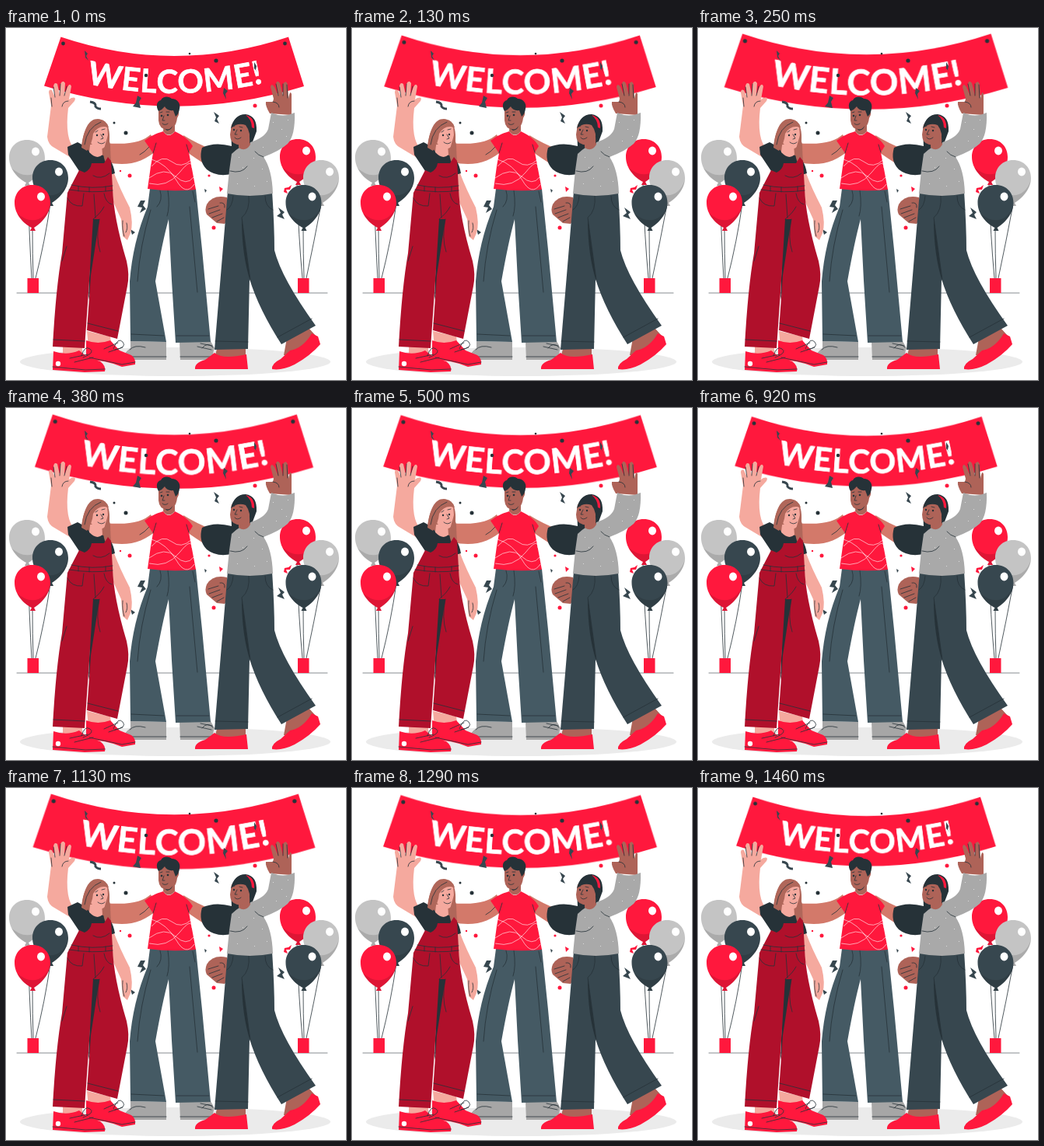
An HTML page for the animation above (1500 ms loop, 437 by 453 pixels).

```html
<!DOCTYPE html>
<html lang="en">
<head>
<meta charset="utf-8">
<title>Welcome</title>
<style>
html, body { margin: 0; width: 100%; height: 100%; overflow: hidden; background: #fff; }
svg { display: block; width: 437px; height: 453px; }
#banner { transform-origin: 216px 56px; }
.red { fill: #ff183d; } .wine { fill: #b0102b; } .ink { fill: #263238; }
.dark { fill: #37474f; } .slate { fill: #455a64; } .grey { fill: #c4c4c4; }
.shoe { fill: #a6a6a6; } .peach { fill: #f5a99e; } .tan { fill: #d3796a; }
.brown { fill: #ae6358; } .hair { fill: #b0675a; } .wool { fill: #a9a9a9; }
.line { fill: none; stroke: #263238; stroke-width: .8; stroke-linecap: round; stroke-linejoin: round; }
.white { fill: none; stroke: #fff; stroke-width: .6; }
text { font: 700 41.5px Lato, sans-serif; fill: #fff; stroke: #fff; stroke-width: .7; letter-spacing: .9px; }
</style>
</head>
<body>
<svg viewBox="0 0 437 453">
<defs>
  <path id="arc" d="M54 58Q216 109.500 378 58"/>
  <g id="balloon">
    <path d="M0-28C14-28 23-18 23-5C23 10 10 22 2 27L4 31H-3L-1 27C-11 22-23 10-23-5C-23-18-14-28 0-28Z"/>
    <path d="M-20 8C-15 18-6 25-1 27L-3 31H4L2 27C11 22 21 12 23-3C16 20-4 23-20 8Z" fill="#000" opacity=".13"/>
    <ellipse cx="11" cy="-13" rx="5" ry="5.400" fill="#fff"/>
  </g>
</defs>

<path class="line" d="M14 341H413" opacity=".7"/>
<ellipse cx="217.500" cy="429.500" rx="199.500" ry="18.500" fill="#ebebeb"/>

<path class="line" d="M28 202Q30 270 33 322M57 226Q50 275 38 322M34 260Q34 290 35 322"/>
<path class="line" d="M374 201Q376 270 381 322M405 227Q396 275 386 322M382 260Q382 290 383 322"/>
<use href="#balloon" class="grey" x="27" y="172"/>
<use href="#balloon" class="dark" x="57" y="198"/>
<use href="#balloon" class="red" x="34" y="230"/>
<use href="#balloon" class="red" x="375" y="171"/>
<use href="#balloon" class="grey" x="405" y="198"/>
<use href="#balloon" class="dark" x="382.500" y="230"/>
<path class="red" d="M27.500 322H42V341H27.500ZM375 322H389.500V341H375Z"/>

<g id="banner">
  <path class="red" d="M70.500 11.500Q216 60.500 363 11.500L383 75Q216 126.500 49 74.500Z"/>
  <circle class="ink" cx="73.500" cy="20" r="2.400"/><circle class="ink" cx="358.500" cy="20" r="2.400"/>
  <text text-anchor="middle"><textPath href="#arc" startOffset="50.500%">WELCOME!</textPath></text>
</g>

<g id="confetti">
  <path class="dark" d="M101 29L105 33L103 36L106 42L102 38ZM169 87L174 90L171 95L173 103L163 101L167 96ZM173 222L179 222L176 228L180 233L172 238L175 231L169 230ZM280 77L285 81L282 85L283 92L279 84ZM319 44L322 49L321 54L324 58L319 52ZM267 108L274 113L271 117L274 123L268 120L270 115ZM160 259L166 263L162 266ZM350 231L358 237L355 240L358 246L348 242L353 238ZM255 207L258 209L256 212Z"/>
  <path d="M108 95Q116 96 115 101Q117 104 122 104" fill="none" stroke="#37474f" stroke-width="3"/>
  <path class="red" d="M367 202L365 208L360 208L362 213L357 211L358 206L363 205ZM274 204L279 207L275 211ZM225 143L230 144L228 148Z"/>
</g>

<!-- man -->
<path class="tan" d="M186 137C176 146 159 151 128 148L129 173C156 178 176 174 195 156ZM228 138Q244 148 264 156L260 178Q244 168 230 158Z"/>
<path class="line" d="M184 153Q178 160 172 163"/>
<path class="shoe" d="M160 403L206 404V427H150Q151 418 160 412ZM223 404L263 403L268 412Q265 418 267 427H224Z"/>
<path class="line" d="M151 423H206M224 423H266M246 410L264 414M250 406L265 409M252 412Q259 403 266 411M179 411Q165 407 159 414" stroke-width="1.200"/>
<path class="slate" d="M185 207H244L252 285L263 404L218 405L213 325L209 246Q201 275 192 326L206 404L160 403L159 326Q163 275 182 230Z"/>
<path class="line" d="M208 209Q211 230 207 242M198 209Q202 222 194 230M161 394L203 396M219 396L261 396M186 234Q172 280 169 326M240 210L243 224M236 230L246 340"/>
<path class="red" d="M202 133C192 136 186 139 178 145L189 161L186 178L182 207Q213 211 244 208L235 160L240 152C235 144 228 138 217 133Q209 143 202 133Z"/>
<path class="white" d="M187 178Q201 162 213 172T239 169M184 193Q204 178 218 191T241 192M184 200Q207 206 223 186T239 180M187 169Q207 175 219 196T242 201"/>
<path class="line" d="M189 161L193 148M235 160L232 150"/>
<path class="brown" d="M203 121H217V133Q209 142 202 133Z"/>
<path class="brown" d="M196 102Q209 96 219 104Q225 108 220 116Q218 131 207 131Q197 130 196 119Z"/>
<path class="ink" d="M196 107C192 100 194 94 199 93C202 87 210 88 213 91C220 91 225 97 223 104Q222 111 218 114L215 106Q207 107 204 101Q201 105 196 107ZM202 128Q209 134 214 126Q213 131 207 132Z"/>
<circle class="ink" cx="200" cy="113" r="1.300"/><circle class="ink" cx="208" cy="112" r="1.300"/>
<path class="line" d="M198 109L201 108M206 108L210 108M203 113L201 119H204M201 123Q204 126 208 123"/>

<!-- woman on the left -->
<path class="peach" d="M132 184L139 187Q146 206 159 231Q164 252 160 264L156 273L150 268L148 246L132 211Z"/>
<path class="line" d="M150 248Q149 260 152 268M155 251Q157 258 154 263"/>
<path class="peach" d="M89 157Q75 143 80 103L88 94Q91 88 84 90L81 92L84 75Q82 70 79 76L75 86L76 71Q73 66 70 72L69 86L66 72Q62 69 61 75L63 89L59 80Q55 78 55 83L58 100L53 140Q54 150 62 154L92 172Z"/>
<path class="line" d="M69 87L70 72M75 87L78 75M63 89L61 76M80 94Q73 94 72 101M59 101L58 90"/>
<path class="hair" d="M97 154C100 130 106 117 118 117C131 118 134 131 133 146L135 181Q127 181 122 160L103 158Z"/>
<path class="ink" d="M79 153L92 147Q101 151 108 160L125 164Q137 168 140 187L130 190L96 187L80 163Z"/>
<path class="peach" d="M108 150L123 150L124 163Q117 170 107 160Z"/>
<path class="peach" d="M108 130Q121 120 130 128Q133 148 126 154Q118 159 110 149Q103 144 106 138Z"/>
<path class="hair" d="M97 154Q99 126 114 119Q128 115 132 128Q119 124 112 136Q111 148 104 158ZM127 152L131 138L134 150L135 180Q126 176 125 160Z"/>
<path class="line" d="M101 150Q104 128 122 121M115 134L118 132M123 131L127 130M122 137L125 142L122 143M118 147Q123 151 127 147"/>
<circle class="ink" cx="117" cy="138" r="1.200"/><circle class="ink" cx="125" cy="137" r="1.200"/>
<path d="M73 409H98V422H73ZM104 390L134 397L136 411H106Z" class="peach"/>
<path class="red" d="M103 402Q118 408 134 402L146 415L161 421Q167 425 166 433L149 436Q128 427 103 427ZM61 416Q78 422 94 415Q105 425 121 429Q129 435 127 442L101 443L60 440Z"/>
<path class="line" d="M60 436L102 440L127 439M107 424L149 433L166 430M82 425L105 420M88 430L112 424M97 422Q101 408 108 413T99 424M126 413L144 405M132 417L150 411M138 413Q144 397 150 404T140 414" stroke-width="1.100"/>
<circle cx="67" cy="432" r="3.200" fill="#fff"/>
<path class="ink" d="M110 236H124L119 290L106 350Z"/>
<path class="wine" d="M94 183L101 186Q109 182 110 174H126L131 166L135 171L137 206Q138 243 155 300Q159 318 156 332L143 400L104 389L109 318L120 246L112 246Q107 330 101 412L60 410Q64 335 72 290L79 212Z"/>
<path class="line" d="M84 202Q111 208 137 203M81 208Q112 213 137 209M93 204V210M107 205V211M128 204V210M79 219Q84 230 98 229L100 213M126 213Q128 225 136 227M61 401L101 403M105 380L144 390M120 246Q115 270 121 288M113 214L115 244M112 190Q122 196 133 187M126 230Q122 238 112 246M72 300L78 281"/>

<!-- woman on the right -->
<path class="brown" d="M284 218Q266 214 258 227Q255 234 258 240L271 251L281 252L289 240Z"/>
<path class="line" d="M260 233L273 229M261 239L275 234M265 244L278 239M271 249L280 244M275 225Q282 224 281 231"/>
<path class="ink" d="M289 132Q292 111 308 111Q323 113 322 133L316 149L304 160Q291 168 290 188Q270 192 258 182Q247 171 252 154Q268 146 290 152Z"/>
<path class="brown" d="M339 110Q333 100 334 95L343 95L344 91L340 76Q341 70 345 76L350 87L347 72Q348 66 352 71L356 87L356 72Q360 66 362 73L363 91Q365 79 367 85L367 112Z"/>
<path class="line" d="M350 87L347 72M356 87L356 72M362 90L361 73M343 95Q351 96 351 102"/>
<path class="brown" d="M272 409H308V425H268ZM361 399L389 386L399 397L377 421H357Z"/>
<path class="red" d="M268 418Q278 427 309 420L311 439H243Q242 431 256 427ZM365 415Q382 412 393 393L401 397L404 407Q391 422 371 433Q355 441 342 439Q341 432 353 426Z"/>
<path class="dark" d="M285 210H342Q345 255 345 286Q354 322 398 383L354 407Q325 362 313 323L311 413L268 414L277 306Z"/>
<path class="ink" d="M303 245L314 326Q303 292 303 245Z"/>
<path class="line" d="M312 215Q314 235 303 244L314 324M269 403L311 404M349 398L393 374M292 216Q291 230 284 234M333 216Q333 230 343 234"/>
<path class="wool" d="M290 162Q300 152 314 147Q333 141 337 130L341 109Q356 116 371 109Q372 138 362 149Q352 158 331 166Q342 182 343 213Q313 219 284 213L287 183Z"/>
<path d="M343 121L344 122M354 130L355 131M362 118L363 119M347 145L348 146M330 153L331 154M318 167L319 168M304 179L305 180M329 181L330 182M297 200L298 201M319 203L320 204M335 197L336 198M310 193L311 194M360 139L361 140M299 166L300 167" stroke="#e3e3e3" stroke-width=".9"/>
<path class="line" d="M331 166Q324 164 320 159M288 184Q303 188 310 178"/>
<path class="brown" d="M299 143L313 139L314 150Q308 160 299 154Z"/>
<path class="brown" d="M290 124Q303 118 313 126Q317 134 312 141Q307 152 297 150Q288 148 288 137Z"/>
<path class="ink" d="M289 129Q293 112 307 112Q322 115 321 134L313 149Q315 134 308 125Q298 121 289 129Z"/>
<path class="red" d="M308 112Q320 115 319 129L316 128Q316 118 308 112Z"/>
<circle class="ink" cx="293" cy="131" r="1.200"/><circle class="ink" cx="302" cy="132" r="1.200"/>
<path class="line" d="M291 127L294 126M300 127L304 128M297 131L294 137H297M294 141Q297 145 302 141"/>
</svg>
<script>
const dots = [
  [154, 135, 2.5, 'ink'], [139, 122, 1.5, 'ink'], [236, 33, 1.3, 'ink'], [270, 42, 2.6, 'ink'],
  [180, 61, 2.2, 'ink'], [320, 100, 2.5, 'red'], [159, 190, 2.5, 'red'], [267, 257, 2.5, 'red'],
  [261, 190, 1.6, 'red'], [147, 184, 1.2, 'red']
];
const confetti = document.getElementById('confetti');
for (const [cx, cy, r, tone] of dots) {
  const dot = document.createElementNS('http://www.w3.org/2000/svg', 'circle');
  Object.entries({ cx, cy, r, class: tone }).forEach(([k, v]) => dot.setAttribute(k, v));
  confetti.append(dot);
}

// Double pulse, played at 24 poses per second
const beat = [[0, 1], [.166, 1.092], [.586, .994], [.736, 1.092], [.986, .994], [1, 1]];
document.getElementById('banner').animate(
  beat.map(([offset, s]) => ({ offset, transform: `scale(${s})` })),
  { duration: 1500, iterations: Infinity, easing: 'steps(36)' }
);
</script>
</body>
</html>
```
